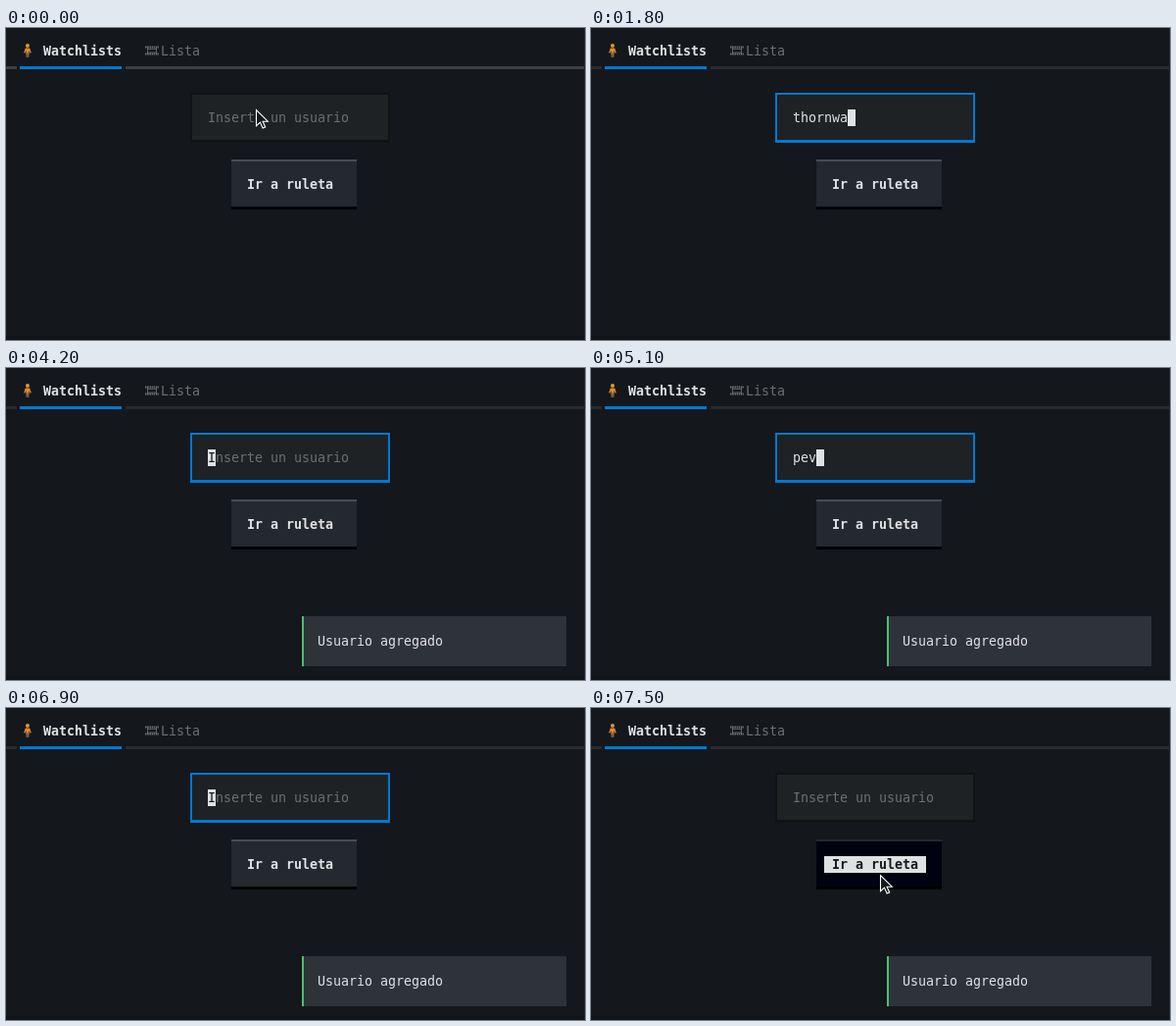
These frames come from a looping animation (591 by 318 pixels, 8 s). An HTML page:

```html
<!DOCTYPE html>
<html lang="es">
<head>
<meta charset="utf-8">
<title>Watchlists</title>
<style>
  html, body { margin: 0; width: 100%; height: 100%; overflow: hidden; background: #14181c; }
  svg { display: block; }
  text {
    font: 13.333px "DejaVu Sans Mono", monospace;
    letter-spacing: -.027px;
    white-space: pre;
    fill: #e0e1e2;
  }
  .bold { font-weight: bold; }
  .dim { fill: #6c6f71; }
  .dark { fill: #14181c; }
  .light { fill: #e0e1e2; }
  .blue { fill: #0178d4; }
</style>
</head>
<body>
<svg width="591" height="318" viewBox="0 0 591 318" shape-rendering="crispEdges">
  <rect width="591" height="318" fill="#14181c"/>
  <rect y="314" width="591" height="4" fill="#101317"/>
  <rect x="590" width="1" height="318" fill="#1c2430"/>

  <g shape-rendering="auto">
    <circle cx="22" cy="18" r="2" fill="#d79a3c"/>
    <path d="M19.8 20.5h4.4l1.6 4.8-1 .4-1.3-2.6v2.4h-3v-2.4l-1.3 2.6-1-.4z" fill="#e5892b"/>
    <path d="M20.3 25h3.4l-.4 5h-1l-.3-4-.3 4h-1z" fill="#8d6a4b"/>
    <g fill="none" stroke="#6c6f71">
      <path d="M142 19.5h14M142 26.5h14" stroke-width="2" stroke-dasharray="1.6 .6"/>
      <path d="M144.5 19v8M153.5 19v8M144 21.5h10M144 25h10" stroke-width=".8"/>
    </g>
  </g>
  <text class="bold" x="38" y="28">Watchlists</text>
  <text class="dim" x="158" y="28">Lista</text>
  <path id="rail" d="M0 39h11v3H0zM122 39h468v3H122z"/>
  <rect class="blue" x="14" y="39" width="104" height="3"/>

  <rect id="frame" x="188" y="66" width="204" height="51"/>
  <rect x="190" y="68" width="200" height="46" fill="#1e2224"/>
  <text id="hint" class="dim" x="206" y="96">Inserte un usuario</text>
  <text id="entry" x="206" y="96"></text>
  <rect id="caret" class="light" y="83" width="8" height="17"/>
  <text id="under" class="dark" x="206" y="96">I</text>

  <rect id="button" x="230" y="134" width="128" height="51"/>
  <rect id="lid" x="230" y="134" width="128" height="2"/>
  <rect x="230" y="182" width="128" height="3" fill="#000"/>
  <rect id="mark" class="light" x="238" y="151" width="104" height="17"/>
  <text id="label" class="bold" x="246" y="164">Ir a ruleta</text>

  <g id="toast">
    <rect x="302" y="253" width="270" height="51" fill="#2e3239"/>
    <rect x="302" y="253" width="2" height="51" fill="#4ebf71"/>
    <text x="318" y="283">Usuario agregado</text>
  </g>

  <path id="pointer" shape-rendering="auto" d="M.5.5v16.2l3.9-3.6 2.7 6 2.6-1.2-2.6-5.7h5.2z"
        fill="#14181c" stroke="#fff" stroke-width="1.1"/>
</svg>
<script>
const LOOP = 8000;
const FIRST = "thornwayfilm", SECOND = "pevor";
const el = id => document.getElementById(id);
const show = (id, on) => el(id).setAttribute("visibility", on ? "visible" : "hidden");
const fill = (id, color) => el(id).setAttribute("fill", color);

const typing = (word, times) =>
  times.map((t, i) => [t, { text: word.slice(0, i + 1), caret: true }]);

// Each step changes part of the state at its time.
const steps = [
  [0, { focus: "tabs", text: "", caret: false, toast: false, hover: false, pointer: [255, 83] }],
  [300, { focus: "input", caret: true }],
  [800, { caret: false }],
  [900, { pointer: null }],
  ...typing(FIRST, [900, 1100, 1300, 1400, 1500, 1700, 1800, 2000, 2200, 2300, 2500, 2700]),
  [4200, { text: "", toast: true }],
  [4700, { caret: false }],
  ...typing(SECOND, [4800, 5000, 5100, 5400, 5900]),
  [5200, { toast: false }],
  [6900, { text: "", toast: true }],
  [7100, { pointer: [257, 87] }],
  [7200, { pointer: [268, 112] }],
  [7300, { pointer: [284, 148], hover: true }],
  [7400, { pointer: [295, 170], caret: false }],
  [7500, { focus: "button" }]
].sort((a, b) => a[0] - b[0]);

function stateAt(time) {
  const state = {};
  for (const [t, change] of steps) if (t <= time) Object.assign(state, change);
  return state;
}

function draw(s) {
  const pressed = s.focus === "button";
  fill("rail", s.focus === "tabs" ? "#3c4043" : "#272b2f");
  fill("frame", s.focus === "input" ? "#0178d4" : "#101214");

  show("hint", !s.text);
  el("entry").textContent = s.text;
  show("caret", s.caret);
  el("caret").setAttribute("x", 206 + 8 * s.text.length);
  show("under", s.caret && !s.text);

  fill("button", s.hover ? "#00030f" : "#24282f");
  fill("lid", s.hover ? "#24282f" : "#474b52");
  show("mark", pressed);
  el("label").classList.toggle("dark", pressed);

  show("toast", s.toast);
  show("pointer", s.pointer);
  if (s.pointer) el("pointer").setAttribute("transform", `translate(${s.pointer})`);
}

const start = performance.now();
function tick() {
  draw(stateAt((performance.now() - start) % LOOP));
  requestAnimationFrame(tick);
}
tick();
</script>
</body>
</html>
```
